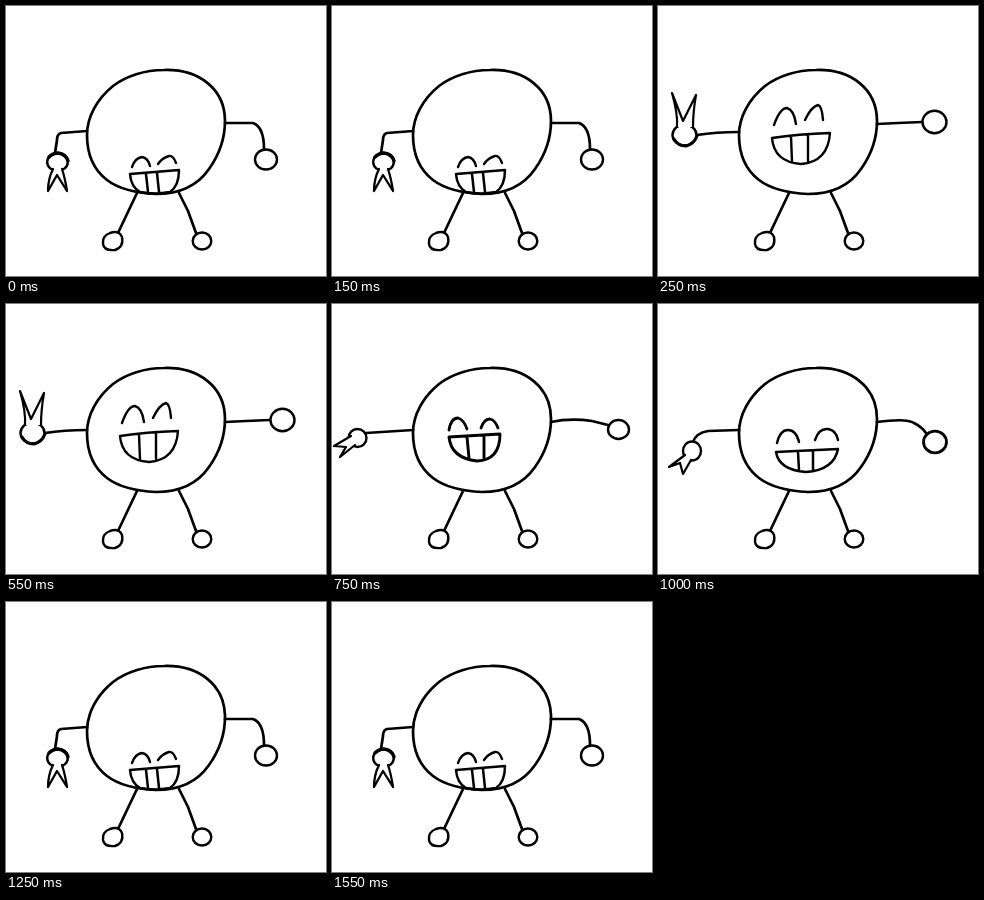
An HTML page that plays this animation: 320x270 px, repeating every 1.75 s.

```html
<!DOCTYPE html>
<html lang="en">
<head>
<meta charset="utf-8">
<title>Waving doodle</title>
<style>
  html, body { margin: 0; width: 100%; height: 100%; overflow: hidden; background: #fff; }
  svg { display: block; width: 100%; height: 100%; }
  path { fill: none; stroke: #000; stroke-linecap: round; stroke-linejoin: round; }
  .fill { fill: #fff; }
</style>
</head>
<body>
<svg viewBox="0 0 320 270">
  <g id="body"></g>
  <g id="pose"></g>
</svg>
<script>
const LOOP = 1750;

const line = (d, w = 2.7, cls = '') => `<path d="${d}" stroke-width="${w}" class="${cls}"/>`;

const ring = (x, y, rx, ry = rx, w = 2.4) =>
  line(`M${x - rx} ${y}a${rx} ${ry} 0 1 1 ${2 * rx} 0a${rx} ${ry} 0 1 1 ${-2 * rx} 0Z`, w, 'fill');

const body =
  line('M158 64C193 63 219 83 219 115C219 132 213 149 203 163C192 179 174 188 150 188C131 187 114 184 101 174C88 164 81 148 81 129C81 111 91 93 107 80C120 70 139 64 158 64Z', 2.7) +
  line('M131 187L121 208L112 227') +
  line('M173 187L182 205L190 227') +
  line('M104 227Q113 224 116 231Q118 241 109 244Q98 245 97 238Q96 230 104 227Z', 2.4, 'fill') +
  ring(196, 235, 9.3, 8.5);

// Arms, hands, eyes and mouth for each pose.
const poses = {
  low:
    line('M81 125L55 127Q51 128 51 134L49 147') +
    ring(51.5, 156, 10.3, 9) +
    line('M43 151Q47 147 52 147Q60 148 62 155', 3.4) +
    line('M47 163Q42 173 42 185L51 169L61 185Q59 172 56 163', 2.3, 'fill') +
    line('M219 117L247 117Q258 121 258 143') +
    ring(260, 153.5, 11, 10) +
    line('M126 161Q129 152 136 151Q142 152 144 160M152 158Q156 152 163 150Q167 149 170 157', 2.4) +
    line('M124 168L173 164Q173 180 164 186Q148 189 134 186Q125 181 124 168ZM140 168L142 186M151 167L153 186', 2.5),
  high:
    line('M81 126Q58 126 39 129') +
    ring(26.5, 129, 12, 10.5) +
    line('M16 133Q20 140 28 140Q36 138 39 130', 3) +
    line('M19 121Q20 108 14 87L25 115L38 89Q35 106 35 121', 2.2, 'fill') +
    line('M219 118L240 117L264 116') +
    ring(276.5, 116, 12, 11.3) +
    line('M116 119Q122 102 129 102Q136 104 138 118M147 114Q153 101 160 99Q164 100 165 114', 2.4) +
    line('M114 132Q140 128 172 127Q170 156 143 158Q116 156 114 132ZM133 130L134 156M150 128L150 155', 2.4),
  side:
    line('M81 126L34 129') +
    ring(25.5, 134, 9, 9) +
    line('M19 132L2 142L14 143L8 153L23 141', 2.2, 'fill') +
    line('M219 118Q238 114 260 117L276 121') +
    ring(286.5, 125.5, 10.5, 9.5) +
    line('M117 126Q119 114 126 114Q132 116 135 125M149 124Q152 115 158 115Q163 116 166 124', 2.8) +
    line('M117 133L168 130Q168 156 145 157Q119 154 117 133ZM135 133L137 154M152 131L152 155', 2.9),
  drop:
    line('M81 126L50 127Q38 129 35 138') +
    ring(34, 147, 9, 9.5) +
    line('M27 151L11 163L22 159L25 170L33 156', 2.2, 'fill') +
    line('M219 118Q249 114 256 119Q264 123 268 129') +
    ring(277, 138, 11.5, 10.8, 2.8) +
    line('M119 139Q122 126 130 126Q138 126 141 138M157 136Q161 124 170 125Q178 126 180 136', 2.4) +
    line('M118 148L180 145Q176 166 148 168Q121 166 118 148ZM140 148L141 166M155 147L155 166', 2.5)
};

// [start in ms, pose]
const steps = [[0, 'low'], [250, 'high'], [750, 'side'], [1000, 'drop'], [1250, 'low']];

const poseGroup = document.getElementById('pose');
let shown = '';

function draw(ms) {
  const t = ms % LOOP;
  const name = steps.filter(([start]) => t >= start).pop()[1];
  if (name === shown) return;
  poseGroup.innerHTML = poses[name];
  shown = name;
}

document.getElementById('body').innerHTML = body;
const begin = performance.now();
function tick() {
  draw(performance.now() - begin);
  requestAnimationFrame(tick);
}
tick();
</script>
</body>
</html>
```
